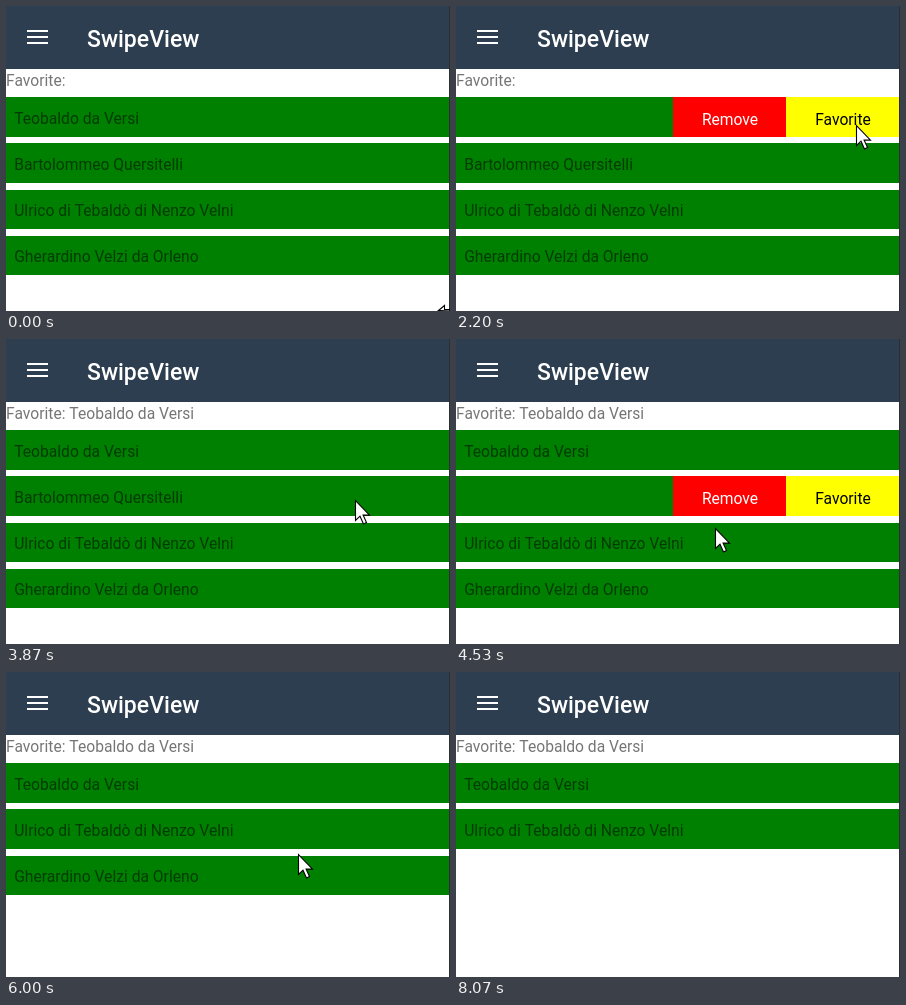
Recreate the animation shown at these times as an HTML page with a canvas. Size 444 px wide and 305 px high, loop 9.67 s.

```html
<!DOCTYPE html>
<html lang="en">
<head>
<meta charset="utf-8">
<title>SwipeView</title>
<style>
  html, body { margin: 0; width: 100%; height: 100%; overflow: hidden; background: #fff; }
  canvas { display: block; }
</style>
</head>
<body>
<canvas id="stage" width="444" height="305"></canvas>
<script>
const ctx = document.getElementById('stage').getContext('2d');
const LOOP = 9670, FPS = 15;
const W = 443, PITCH = 46, ITEM = 113, OPEN = 2 * ITEM, CLOSE_TICKS = 3;
const GREY = 'rgba(0,0,0,.54)';
const BODY = '15.65px Roboto, sans-serif';
const TITLE = '500 23px Roboto, sans-serif';

// All times below are in ticks of 1/15 s.
const FAVORITE_TAP = 38, REMOVE_TAP = 79, LAST_TAP = 114;

const people = [
  { name: 'Teobaldo da Versi', gone: Infinity },
  { name: 'Bartolommeo Quersitelli', gone: REMOVE_TAP },
  { name: 'Ulrico di Tebaldò di Nenzo Velni', gone: Infinity },
  { name: 'Gherardino Velzi da Orleno', gone: LAST_TAP }
];

const clamp = (v, lo, hi) => Math.min(hi, Math.max(lo, v));
const mix = (a, b, k) => a + (b - a) * k;
const ease = k => k * k * (3 - 2 * k);

const home = { x: 428, y: 285 };
const legs = [], swipes = [];

function glide(start, end, x, y) {
  legs.push({ start, end, x, y });
}

// Swipes the next list slot open; it slides shut after the tap.
function drag(start, end, x, y, tap) {
  swipes.push({ start, end, tap, grip: legs[legs.length - 1].x });
  glide(start, end, x, y);
}

glide(1, 13, 372, 104);
drag(13, 21, 96, 97, FAVORITE_TAP);
glide(24, 33, 400, 119);
glide(43, 47, 361, 218);
glide(47, 58, 349, 161);
drag(58, 61, 19, 160, REMOVE_TAP);
glide(64, 68, 259, 189);
glide(68, 77, 276, 160);
glide(86, 95, 315, 212);
drag(95, 99, -20, 205, LAST_TAP);
glide(102, 111, 279, 207);
glide(119, 121, 245, 320);

function pointerAt(t) {
  return legs.reduce((p, leg) => {
    const k = ease(clamp((t - leg.start) / (leg.end - leg.start), 0, 1));
    return { x: mix(p.x, leg.x, k), y: mix(p.y, leg.y, k) };
  }, home);
}

function offsetAt(swipe, t) {
  if (!swipe || t < swipe.start) return 0;
  if (t < swipe.end) return clamp(swipe.grip - pointerAt(t).x, 0, OPEN);
  return OPEN * (1 - clamp((t - swipe.tap) / CLOSE_TICKS, 0, 1));
}

function rect(x, y, w, h, color) {
  ctx.fillStyle = color;
  ctx.fillRect(x, y, w, h);
}

function text(str, x, y, color, font = BODY, align = 'left') {
  ctx.font = font;
  ctx.textAlign = align;
  ctx.fillStyle = color;
  ctx.fillText(str, x, y);
}

function outline(x, y, points) {
  ctx.beginPath();
  points.forEach(([px, py]) => ctx.lineTo(x + px + 0.5, y + py + 0.5));
  ctx.closePath();
  ctx.fillStyle = '#fff';
  ctx.fill();
  ctx.strokeStyle = '#000';
  ctx.lineWidth = 1.1;
  ctx.stroke();
}

function drawPointer(t) {
  // The pointer starts as a resize handle on the window's corner.
  if (t < 1) return outline(432, 304, [[0, 0], [6, -5], [6, -1], [18, -1]]);
  const { x, y } = pointerAt(t);
  outline(Math.round(x), Math.round(y),
    [[0, 0], [0, 20], [4.5, 15.7], [8, 23.5], [11, 22], [7.6, 14.6], [14, 14.6]]);
}

function drawItem(label, x, y, h, base, fill, color) {
  rect(x, y, ITEM, h, fill);
  text(label, x + ITEM / 2 + 0.5, base, color, BODY, 'center');
}

function drawRow(name, slot, offset) {
  const y = Math.round(91.2 + 46.2 * slot);
  const h = 131 + PITCH * slot - y;
  const base = 118 + PITCH * slot;
  if (offset > 0) {
    drawItem('Remove', W - OPEN, y, h, base + 1, '#f00', '#fff');
    drawItem('Favorite', W - ITEM, y, h, base + 1, '#ff0', '#000');
  }
  rect(-offset, y, W, h, '#008000');
  text(name, 8.2 - offset, base, GREY);
}

function drawHeader() {
  rect(0, 0, 444, 63, '#2c3e50');
  for (let i = 0; i < 3; i++) rect(21, 24 + 6 * i, 21, 2, '#fff');
  text('SwipeView', 81, 41, '#fff', TITLE);
}

function draw(t) {
  rect(0, 0, 444, 305, '#fff');
  drawHeader();
  text('Favorite: ' + (t < FAVORITE_TAP ? '' : people[0].name), 0, 80, GREY);
  people.filter(p => t < p.gone)
    .forEach((p, slot) => drawRow(p.name, slot, offsetAt(swipes[slot], t)));
  rect(W, 0, 1, 305, '#2b2f33');
  drawPointer(t);
}

function tick() {
  const ms = performance.now() % LOOP;
  draw(Math.floor((ms + 5) * FPS / 1000));
  requestAnimationFrame(tick);
}
tick();
</script>
</body>
</html>
```
